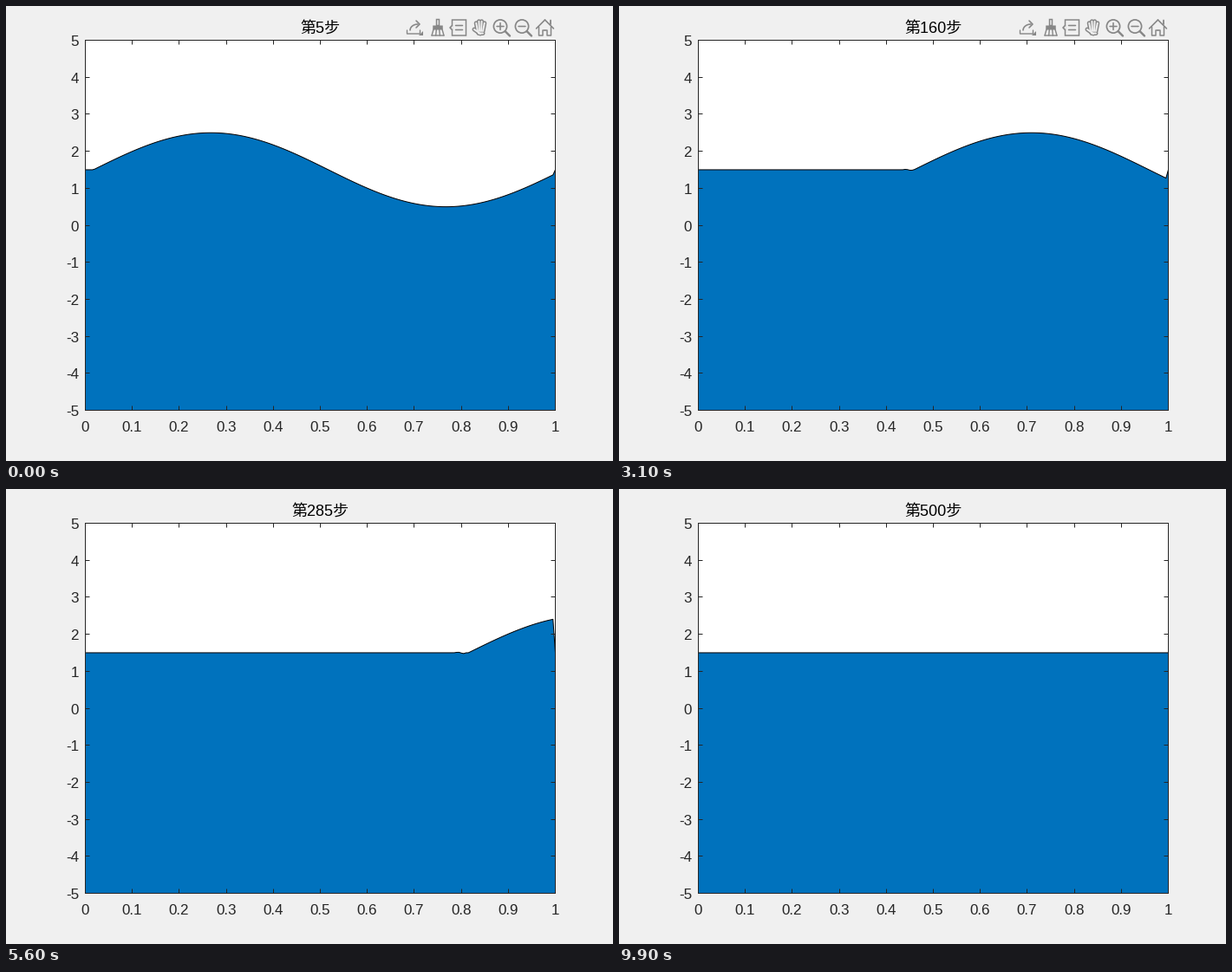
Recreate the animation shown at these times as a matplotlib script. Size 700 by 525 pixels, loop 10000 ms.

```python
import numpy as np
import matplotlib.pyplot as plt
from matplotlib.animation import FuncAnimation
from matplotlib.patches import Circle, Polygon, Rectangle

W, H, DPI = 700, 525, 100
PX = 72 / DPI
LEFT, RIGHT, TOP, BOTTOM = 91.5, 633.5, 39.5, 466.5
PAPER, INK, ICON = "#f0f0f0", "#262626", "#868686"
SPEED, LEVEL, CELLS = 0.00285, 1.5, 200

plt.rcParams["font.family"] = ["Liberation Sans", "Noto Sans CJK JP"]
fig = plt.figure(figsize=(W / DPI, H / DPI), dpi=DPI, facecolor=PAPER)
ax = fig.add_axes([0, 0, 1, 1])
ax.set(xlim=(0, W), ylim=(H, 0))
ax.axis("off")


def to_px(x, y):
    return LEFT + x * (RIGHT - LEFT), TOP + (5 - y) * (BOTTOM - TOP) / 10


def line(xs, ys, color=INK, width=1.0, cap="butt", z=5):
    return ax.plot(xs, ys, color=color, lw=width * PX, zorder=z, snap=False,
                   solid_capstyle=cap, solid_joinstyle="round")[0]


def label(x, y, text, size, **kw):
    return ax.text(x, y, text, fontsize=size * PX, va="baseline", **kw)


def draw_axes():
    corner, size = (LEFT, TOP), (RIGHT - LEFT, BOTTOM - TOP)
    ax.add_patch(Rectangle(corner, *size, fc="white", ec="none", zorder=1))
    ax.add_patch(Rectangle(corner, *size, fill=False, ec=INK, lw=PX,
                           snap=False, zorder=5))
    for i in range(11):
        x, y = np.floor(to_px(i / 10, i - 5)) + 0.5
        for edge, inward in ((TOP, 5), (BOTTOM, -5)):
            line([x, x], [edge, edge + inward])
        for edge, inward in ((LEFT, 5), (RIGHT, -5)):
            line([edge, edge + inward], [y, y])
        label(x - 0.5, 491, f"{i / 10:g}", 17, ha="center", color=INK)
        label(84, y + 6.5, str(i - 5), 17, ha="right", color=INK)


# Toolbar icons, each drawn around its own centre
icons = []


def stroke(cx, cy, xs, ys, width=1.6, color=ICON, z=5):
    icons.append(line(cx + np.array(xs), cy + np.array(ys), color, width, "round", z))


def box(cx, cy, w, h, fill="none"):
    icons.append(ax.add_patch(Rectangle((cx - w / 2, cy - h / 2), w, h, fc=fill,
                                        ec=ICON, lw=1.5 * PX, snap=False, zorder=5)))


def chevron(cx, cy, dx, dy):
    stroke(cx, cy, [-dx, 0, -dx], [-dy, 0, dy])


def export_icon(cx, cy):
    a = np.linspace(0, np.pi / 2, 12)
    stroke(cx, cy, 4 - 9 * np.cos(a), 3 - 7 * np.sin(a))
    chevron(cx + 6, cy - 4, 4, 4)
    stroke(cx - 1, cy + 5, [-7.5, -7.5, 7.5, 7.5], [-2, 2, 2, -2], 1.4)
    corner = np.array([cx + 10, cy + 9])
    icons.append(ax.add_patch(Polygon([corner, corner - (5, 0), corner - (0, 5)],
                                      fc=ICON, ec="none", zorder=5)))


def brush_icon(cx, cy):
    box(cx, cy - 6, 3, 7)
    box(cx, cy, 10, 3.5, ICON)
    for x in np.linspace(-1, 1, 4):
        stroke(cx, cy, [5 * x, 7 * x], [2, 9], 1.4)
    stroke(cx, cy, [-7, 7], [9, 9], 1.4)


def tip_icon(cx, cy):
    box(cx, cy, 16, 18)
    for y in (-2.5, 2.5):
        stroke(cx, cy, [-4, 4], [y, y])
    stroke(cx - 8, cy, [0, 0], [-2, 2], 2, PAPER)
    stroke(cx - 8, cy, [0, -2.5, 0], [-2.5, 0, 2.5])


def hand_icon(cx, cy):
    # wide grey strokes with a paper core leave an outlined hand
    for width, color, z in ((5, ICON, 5), (2, PAPER, 6)):
        for i in range(4):
            lean = i - 1.5
            stroke(cx, cy, [2 * lean, 3.2 * lean], [4, lean ** 2 - 7.5], width, color, z)
        stroke(cx, cy, [0, -7], [7, 2], width, color, z)
        stroke(cx, cy, [-2, 3], [6.5, 6.5], width, color, z)


def zoom_icon(cx, cy, plus):
    icons.append(ax.add_patch(Circle((cx, cy), 7.6, fill=False, ec=ICON,
                                     lw=1.7 * PX, zorder=5)))
    stroke(cx, cy, [5.6, 11], [5.6, 11], 2.4)
    stroke(cx, cy, [-4, 4], [0, 0])
    if plus:
        stroke(cx, cy, [0, 0], [-4, 4])


def home_icon(cx, cy):
    for side in (-1, 1):
        x = side * np.array([10, 0])
        stroke(cx, cy, x, [1, -9])
        stroke(cx, cy, side * np.array([7, 7, 2.5, 2.5, 0]), [-1, 9, 9, 3, 3], 1.5)
    stroke(cx, cy, [6.5, 6.5], [-4, -8.5], 1.8)


draw_axes()
export_icon(471, 25)
brush_icon(498, 25)
tip_icon(522.5, 25)
hand_icon(547, 25)
zoom_icon(570, 23.5, True)
zoom_icon(595, 23.5, False)
home_icon(621.5, 25)

title = label(362.5, 32, "", 18, ha="center", color="black", weight="light")
water = ax.add_patch(Polygon([(0, 0), (1, 0), (1, 1)], fc="#0072bd", ec="black",
                             lw=PX, joinstyle="round", snap=False, zorder=2))
grid = np.linspace(0, 1, CELLS + 1)


def bump(center, width=0.0035):
    return np.exp(-((grid - center) / width) ** 2)


def profile(step):
    """Sine wave drifting right, with a small ripple trailing its rear edge."""
    front = SPEED * (step + 1)
    lag = 4e-5 * step
    growth = min(1, step / 200)
    u = LEVEL + np.where(grid > front, np.sin(2 * np.pi * (grid - front)), 0)
    # numerical dispersion smears the rear corner as it travels
    u -= 0.025 * growth * bump(front - lag)
    u += 0.02 * growth ** 2 * bump(front - lag - 0.011)
    u[-1] = LEVEL
    return u


def draw(k):
    step = 5 * (k + 1)
    surface = np.column_stack(to_px(grid, profile(step)))
    water.set_xy(np.vstack([surface, [(RIGHT, BOTTOM), (LEFT, BOTTOM)]]))
    title.set_text(f"第{step}步")
    shown = k < 17 or 29 <= k < 42
    for part in icons:
        part.set_visible(shown)
    return [water, title, *icons]


anim = FuncAnimation(fig, draw, frames=100, interval=100, repeat=True,
                     repeat_delay=0, blit=False)
plt.show()
```
